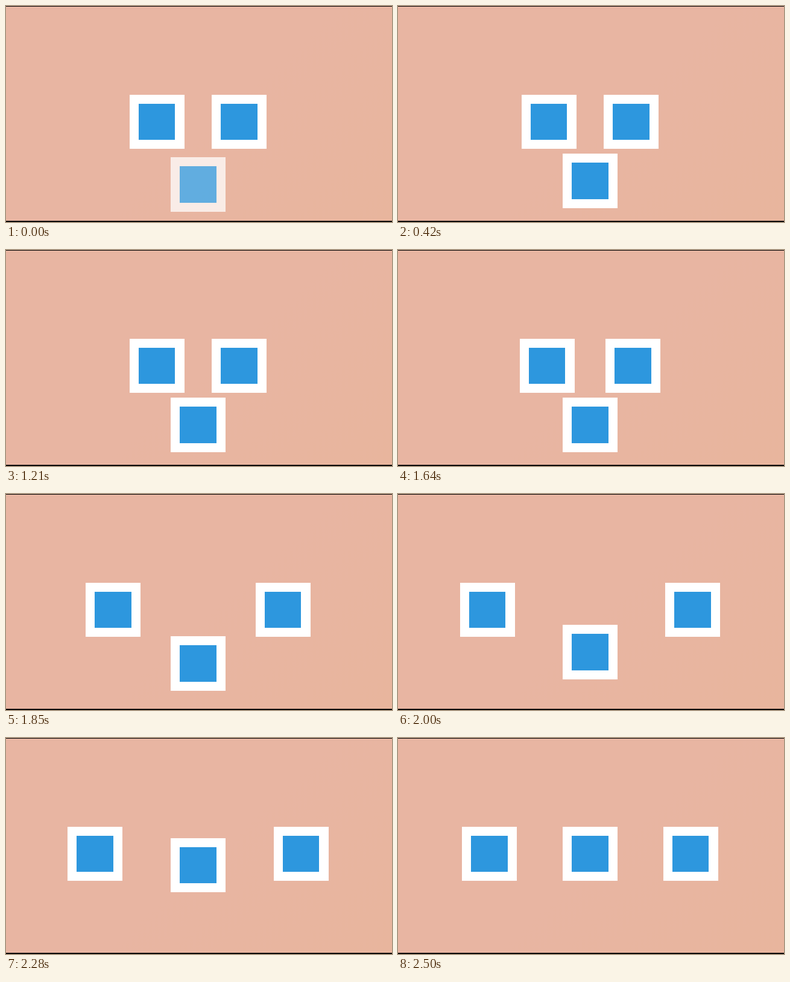
Animation of 640x360 px, one loop 3.5 s. Source, as an HTML page with a canvas:

```html
<!DOCTYPE html>
<html lang="en">
<head>
<meta charset="utf-8">
<title>Three squares</title>
<style>
  html, body { margin: 0; width: 100%; height: 100%; overflow: hidden; background: #e8b5a2; }
  canvas { display: block; width: 640px; height: 360px; }
</style>
</head>
<body>
<canvas id="stage" width="640" height="360"></canvas>
<script>
const ctx = document.getElementById('stage').getContext('2d');
const LOOP = 3500, STEP = 2500 / 35, LAST = 35;
const SIZE = 90.7, BORDER = 15.1;
const ROW = 147.6, LOW = 246.2;
const SPREAD = 98.65, PEAK = 105.5;

const clamp = v => Math.min(1, Math.max(0, v));
const mix = (a, b, p) => a + (b - a) * p;

// Cubic-bezier easing with control points (x1, 0) and (x2, 1)
function ease(x1, x2, x) {
  if (x <= 0) return 0;
  if (x >= 1) return 1;
  let lo = 0, hi = 1;
  for (let i = 0; i < 30; i++) {
    const t = (lo + hi) / 2, u = 1 - t;
    if (3 * u * u * t * x1 + 3 * u * t * t * x2 + t * t * t < x) lo = t;
    else hi = t;
  }
  return lo * lo * (3 - 2 * lo);
}

const span = (t, from, to) => clamp((t - from) / (to - from));

// The motion advances 14 times a second, then rests until the loop ends
function snap(t) {
  const tick = Math.floor(t / 10) * 10 + 10;
  const i = Math.min(LAST, Math.ceil(tick / STEP - 1e-6) - 1);
  return Math.floor(i * STEP / 10 + 1e-6) * 10;
}

function fillBox(x, y, size, color) {
  const l = Math.round(x), t = Math.round(y);
  ctx.fillStyle = color;
  ctx.fillRect(l, t, Math.round(x + size) - l, Math.round(y + size) - t);
}

function square(x, y, alpha = 1) {
  ctx.globalAlpha = alpha;
  fillBox(x, y, SIZE, '#fff');
  fillBox(x + BORDER, y + BORDER, SIZE - 2 * BORDER, '#2d97de');
  ctx.globalAlpha = 1;
}

const backdrop = ctx.createLinearGradient(420, 120, 640, 360);
backdrop.addColorStop(0, '#e8b5a2');
backdrop.addColorStop(1, '#e8b59d');

function draw(t) {
  ctx.fillStyle = '#000';
  ctx.fillRect(0, 0, 640, 360);
  ctx.fillStyle = backdrop;
  ctx.fillRect(0, 1, 640, 357);

  // Outer squares slide apart, overshoot and settle
  const out = PEAK * ease(.5, .34, span(t, 1570, 2100));
  const shift = mix(out, SPREAD, ease(.42, .58, span(t, 2100, 2500)));
  square(204.85 - shift, ROW);
  square(341.2 + shift, ROW);

  // Middle square finishes fading in, then rises into the row
  const rest = (1 - span(t, 0, 280)) ** 2;
  const rise = ease(.487, .666, span(t, 1640, 2500));
  square(273.2, mix(LOW, ROW, rise) + 6 * rest, 1 - .26 * rest);
}

function loop() {
  draw(snap(performance.now() % LOOP));
  requestAnimationFrame(loop);
}
loop();
</script>
</body>
</html>
```
